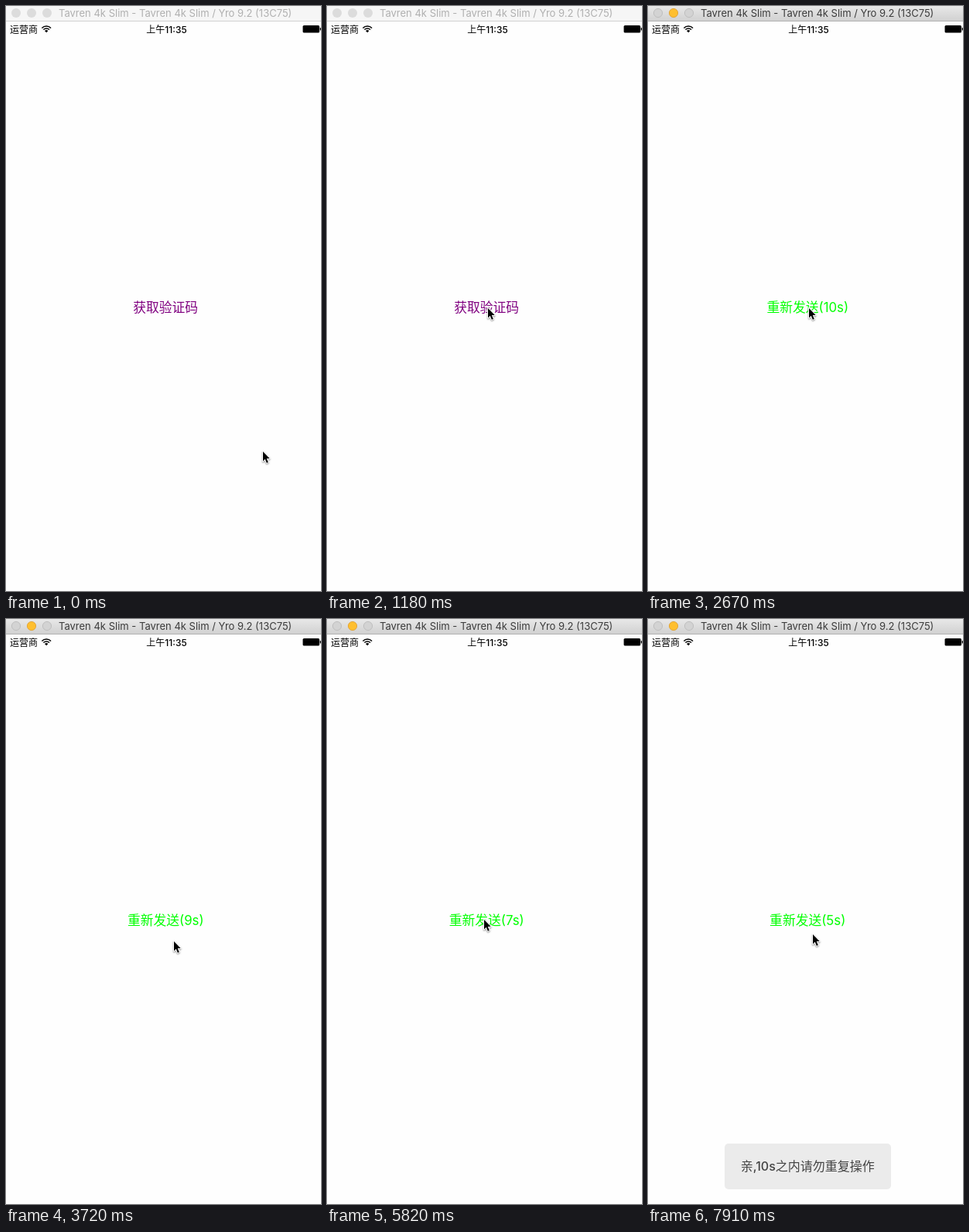
Animation of 407 by 755 pixels, one loop 8000 ms. Source, as an HTML page with a canvas:

```html
<!DOCTYPE html>
<html lang="zh-CN">
<head>
<meta charset="utf-8">
<style>
  html, body { margin: 0; width: 100%; height: 100%; overflow: hidden; background: #fefefe; }
  canvas { display: block; }
</style>
</head>
<body>
<canvas id="stage" width="407" height="755"></canvas>
<script>
const ctx = document.getElementById('stage').getContext('2d');
const LOOP = 8000;
const FONT = 'Inter, "Noto Sans CJK SC", "Noto Sans CJK", sans-serif';
const TITLE = 'Tavren 4k Slim - Tavren 4k Slim / Yro 9.2 (13C75)';

// Each move advances in equal steps, the first one landing at `start`.
const moves = [
  { start: 150, end: 1180, steps: 8, to: [208, 390] },
  { start: 3120, end: 3720, steps: 5, to: [217, 416] },
  { start: 5220, end: 5820, steps: 5, to: [203, 388] },
  { start: 7610, end: 7910, steps: 3, to: [213, 407] }
];
const countdown = [[2670, 10], [3720, 9], [4770, 8], [5670, 7], [6710, 6], [7760, 5]];

const smooth = p => p * p * (3 - 2 * p);

function text(str, x, y, size, color, { weight = 400, align = 'left' } = {}) {
  ctx.font = `${weight} ${size}px ${FONT}`;
  ctx.textAlign = align;
  ctx.fillStyle = color;
  ctx.fillText(str, x, y);
}

function roundRect(x, y, w, h, r, color) {
  ctx.fillStyle = color;
  ctx.beginPath();
  ctx.roundRect(x, y, w, h, r);
  ctx.fill();
}

function dot(x, fill, stroke) {
  ctx.beginPath();
  ctx.arc(x, 9, stroke ? 5.6 : 6, 0, Math.PI * 2);
  ctx.fillStyle = fill;
  ctx.fill();
  if (!stroke) return;
  ctx.strokeStyle = stroke;
  ctx.lineWidth = 0.9;
  ctx.stroke();
}

function titleBar(active) {
  const fill = ctx.createLinearGradient(0, 0, 0, 19);
  fill.addColorStop(0, active ? '#e8e8e8' : '#f6f6f6');
  fill.addColorStop(1, active ? '#d1d1d1' : '#f6f6f6');
  ctx.fillStyle = fill;
  ctx.fillRect(0, 0, 407, 19);
  ctx.fillStyle = active ? '#b2b2b2' : '#d2d2d2';
  ctx.fillRect(0, 19, 407, 1);
  for (const x of [13, 33, 53]) {
    if (!active) dot(x, '#dcdcdc');
    else if (x === 33) dot(x, '#ffbf2f', '#e0a131');
    else dot(x, '#d3d3d3', '#bcbcbc');
  }
  text(TITLE, 68, 14, 13, active ? '#3c3c3c' : '#b0b0b0');
}

function wifi(x, y) {
  ctx.strokeStyle = ctx.fillStyle = '#000';
  ctx.lineWidth = 1.5;
  const from = -Math.PI * 0.75, to = -Math.PI * 0.25;
  for (const r of [8.3, 5.4]) {
    ctx.beginPath();
    ctx.arc(x, y, r, from, to);
    ctx.stroke();
  }
  ctx.beginPath();
  ctx.moveTo(x, y);
  ctx.arc(x, y, 3.2, from, to);
  ctx.fill();
}

function statusBar() {
  text('运营商', 5, 35, 12, '#000');
  wifi(52.2, 34.3);
  text('上午11:35', 207.5, 35, 12, '#000', { weight: 500, align: 'center' });
  roundRect(383.5, 25, 21.5, 9.5, 1.5, '#000');
  roundRect(405.7, 28, 1.3, 3.5, 0.5, '#000');
}

function label(t) {
  const tick = countdown.filter(([at]) => t >= at).pop();
  const str = tick ? `重新发送(${tick[1]}s)` : '获取验证码';
  text(str, 206.2, 394.5, 16.8, tick ? '#00ff00' : '#800080', { align: 'center' });
}

function toast(t) {
  if (t < 6270) return;
  const settled = t >= 6410;
  roundRect(99, 677, 215, 59, 5, settled ? '#ebebeb' : '#ececec');
  text('亲,10s之内请勿重复操作', 206.3, 712, 16, settled ? '#444' : '#585858',
    { weight: 500, align: 'center' });
}

function cursorAt(t) {
  let pos = [332, 575];
  for (const { start, end, steps, to } of moves) {
    if (t < start) break;
    const gap = (end - start) / (steps - 1);
    const step = Math.min(steps, Math.floor((t - start) / gap + 1e-6) + 1);
    const p = smooth(step / steps);
    pos = pos.map((v, i) => v + (to[i] - v) * p);
  }
  return pos.map(Math.round);
}

function cursor([x, y]) {
  const arrow = new Path2D('M0 0V12.4L2.8 9.8L4.8 14.7L6.8 13.9L4.8 9.1H8.7Z');
  ctx.save();
  ctx.translate(x, y);
  ctx.lineWidth = 2;
  ctx.lineJoin = 'round';
  ctx.strokeStyle = '#fff';
  ctx.shadowColor = 'rgba(0,0,0,.45)';
  ctx.shadowBlur = 2;
  ctx.shadowOffsetY = 1;
  ctx.stroke(arrow);
  ctx.shadowColor = 'transparent';
  ctx.fillStyle = '#000';
  ctx.fill(arrow);
  ctx.restore();
}

function draw(now) {
  const t = now % LOOP;
  ctx.fillStyle = '#fefefe';
  ctx.fillRect(0, 0, 407, 755);
  titleBar(t >= 1770);
  statusBar();
  label(t);
  toast(t);
  cursor(cursorAt(t));
}

const origin = performance.now();
function frame() {
  draw(performance.now() - origin);
  requestAnimationFrame(frame);
}
frame();
</script>
</body>
</html>
```
